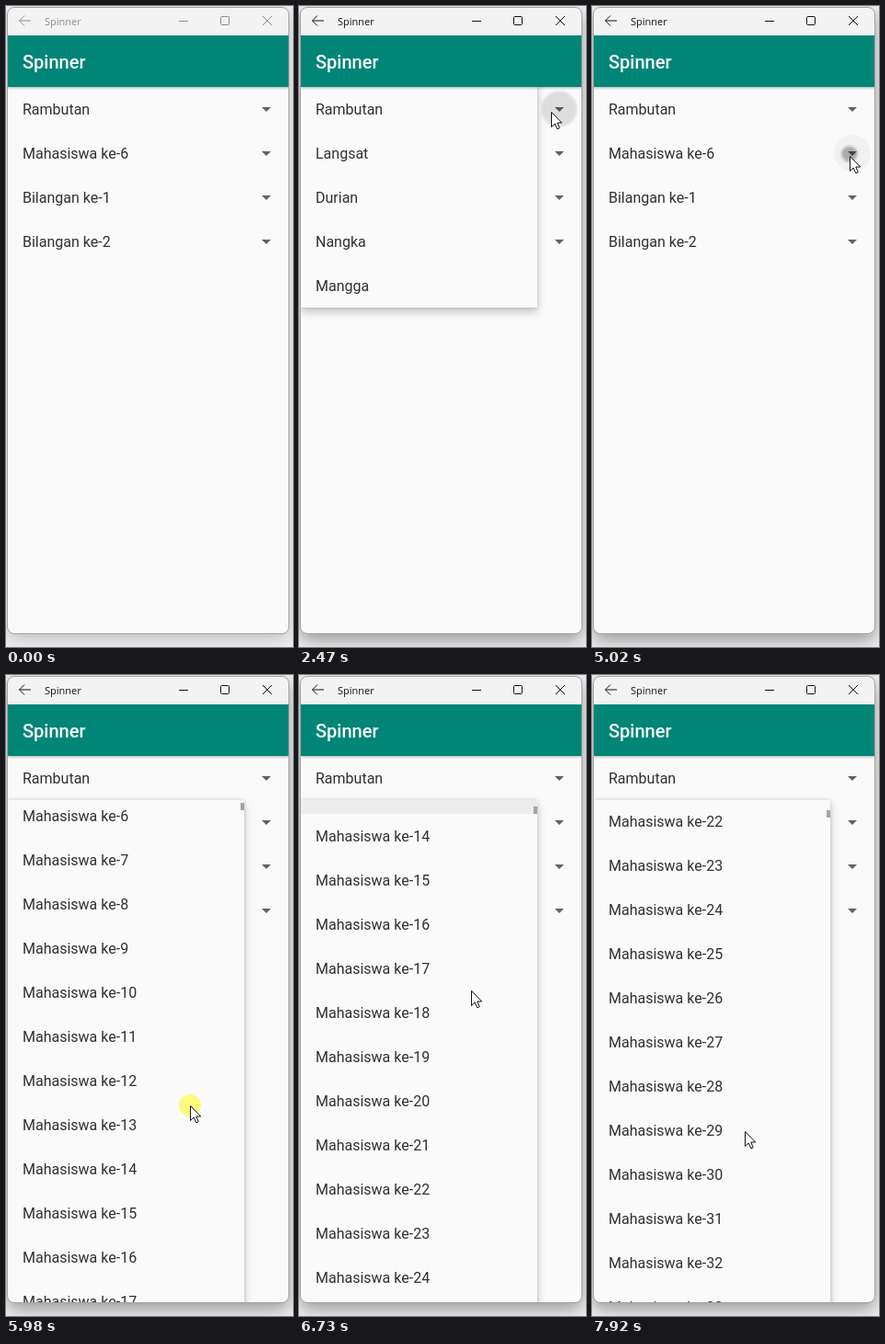
Recreate the animation shown at these times as an HTML page. Size 312 by 697 pixels, loop 7.99 s.

```html
<!DOCTYPE html>
<html lang="id">
<head>
<meta charset="utf-8">
<title>Spinner</title>
<style>
html, body { margin: 0; height: 100%; overflow: hidden; background: #eee; }
svg { display: block; }
text { font: 16px Roboto, sans-serif; fill: #303030; }
#bar text { font: 500 20px Roboto, sans-serif; fill: #fff; }
#caption { stroke: #8c8c8c; fill: none; }
#caption text { font: 11px "Open Sans", sans-serif; fill: #8c8c8c; stroke: none; }
#caption.on { stroke: #111; }
#caption.on text { fill: #111; }
#frame { fill: #fafafa; filter: drop-shadow(0 5px 9px rgba(0,0,0,.2)); }
#frame.on { filter: drop-shadow(0 7px 9px rgba(0,0,0,.36)); }
#bar { filter: drop-shadow(0 1px 1.5px rgba(0,0,0,.3)); }
.panel { fill: #fafafa; filter: drop-shadow(0 0 2px rgba(0,0,0,.14)) drop-shadow(0 5px 5px rgba(0,0,0,.2)); }
</style>
</head>
<body>
<svg width="312" height="697" viewBox="0 0 312 697">
  <defs>
    <clipPath id="window"><rect x="2" y="2" width="305" height="680" rx="7"/></clipPath>
    <clipPath id="listArea"><rect x="2" y="136" width="257" height="546"/></clipPath>
    <filter id="soft" x="-50%" y="-50%" width="200%" height="200%"><feGaussianBlur stdDeviation="1.6"/></filter>
  </defs>
  <rect id="frame" x="1.5" y="1.5" width="306" height="681" rx="7.5"/>
  <g clip-path="url(#window)">
    <rect x="2" y="1" width="306" height="31" fill="#f3f3f3"/>
    <g id="caption">
      <path d="M27 16H14.5M20 10.5L14.5 16L20 21.5M188 16.5H198M279 11L289 21M289 11L279 21"/>
      <rect x="233.5" y="11.5" width="9" height="9" rx="1"/>
      <text x="42" y="21">Spinner</text>
    </g>
    <g id="rows"></g>
    <g id="ripple">
      <circle id="halo" r="20"/>
      <circle id="blob" filter="url(#soft)"/>
    </g>
    <g id="fruits"><rect class="panel" x="2" y="80" width="257" height="248"/></g>
    <g id="students">
      <rect class="panel" x="2" y="136" width="257" height="560"/>
      <g clip-path="url(#listArea)">
        <g id="list"><rect id="hover" x="2" y="472" width="257" height="48" fill="#ededed"/></g>
      </g>
      <rect id="thumb" x="255" width="4" height="8" fill="#a3a3a3"/>
    </g>
    <g id="bar">
      <rect x="2" y="32" width="306" height="56" fill="#008577"/>
      <text x="18" y="68">Spinner</text>
    </g>
  </g>
  <rect x="1.5" y="1.5" width="306" height="681" rx="7.5" fill="none" stroke="#a2a2a2"/>
  <g id="mouse">
    <circle id="press" r="12" fill="#fffb7d"/>
    <path id="arrow" d="M.5 .5V16.5L4.2 13L6.8 18.8L9.3 17.7L6.8 12H11.7Z" fill="#fff" stroke="#111"/>
  </g>
</svg>
<script>
const LOOP = 7990, ROW = 48;
const $ = id => document.getElementById(id);
const set = (id, attrs) => { for (const k in attrs) $(id).setAttribute(k, attrs[k]); };

function add(parent, tag, attrs, label = '') {
  const el = document.createElementNS('http://www.w3.org/2000/svg', tag);
  for (const k in attrs) el.setAttribute(k, attrs[k]);
  el.textContent = label;
  $(parent).append(el);
}
const addText = (parent, mid, label) => add(parent, 'text', { x: 18, y: mid + 6 }, label);

['Rambutan', 'Mahasiswa ke-6', 'Bilangan ke-1', 'Bilangan ke-2'].forEach((label, i) => {
  const y = 112 + i * ROW;
  addText('rows', y, label);
  add('rows', 'path', { d: `M278 ${y - 2}h10l-5 5z`, fill: '#626262' });
});
['Rambutan', 'Langsat', 'Durian', 'Nangka', 'Mangga']
  .forEach((label, i) => addText('fruits', 112 + i * ROW, label));
for (let n = 6; n < 36; n++) addText('list', 160 + (n - 6) * ROW, 'Mahasiswa ke-' + n);

// time, x, y
const path = [
  [750, 197, 651], [1230, 283, 109], [1510, 274, 115], [2810, 274, 115],
  [3490, 93, 276], [3750, 93, 276], [3820, 102, 280], [4080, 190, 371],
  [4250, 190, 371], [4550, 282, 163], [4630, 280, 163], [5250, 280, 163],
  [5390, 271, 180], [5800, 200, 478], [5920, 200, 478], [5980, 200, 468],
  [6190, 194, 200], [6300, 194, 200], [6730, 187, 343], [7000, 175, 535],
  [7080, 175, 535], [7290, 195, 232], [7400, 195, 232], [7850, 166, 493], [7920, 166, 496]
];
// time, list offset
const scroll = [
  [5930, 0], [5980, 5], [6190, 350], [6250, 361], [6600, 369], [7080, 369],
  [7290, 664], [7400, 715], [7550, 750], [7700, 766], [7850, 769]
];
const presses = [[1820, 1960], [4130, 4260], [4780, 4940], [5900, 6190], [7060, 7290]];
// start, end, row centre
const ripples = [[1960, 2740, 112], [4960, 5390, 160]];

const clamp = v => Math.max(0, Math.min(1, v));
const ramp = (t, from, to) => clamp((t - from) / (to - from));
const smooth = u => u * u * (3 - 2 * u);
const linear = u => u;
const within = (t, [from, to]) => t >= from && t < to;

function sample(keys, t, ease) {
  const i = keys.findIndex(k => k[0] > t);
  if (i < 0) return keys.at(-1).slice(1);
  if (i === 0) return keys[0].slice(1);
  const a = keys[i - 1], b = keys[i], u = ease(ramp(t, a[0], b[0]));
  return a.slice(1).map((v, j) => v + (b[j + 1] - v) * u);
}

function drawRipple(t) {
  const r = ripples.find(r => within(t, r));
  set('ripple', { visibility: r ? 'visible' : 'hidden' });
  if (!r) return;
  const [from, to, y] = r, grow = ramp(t, from, from + 300), fade = 1 - ramp(t, to - 250, to);
  set('halo', { cx: 283, cy: y, opacity: .035 * fade });
  set('blob', { cx: 279 + 4 * grow, cy: y + 1 - grow, r: 6 + 13 * grow, opacity: (.34 - .26 * grow) * fade });
}

function draw(t) {
  const focus = t >= 1870 ? 'on' : '';
  set('caption', { class: focus });
  set('frame', { class: focus });

  drawRipple(t);
  set('fruits', { opacity: ramp(t, 2090, 2230) * (1 - ramp(t, 4240, 4380)) });
  set('students', { opacity: ramp(t, 5090, 5230) });

  const offset = Math.round(sample(scroll, t, linear)[0]);
  set('list', { transform: `translate(0 ${-offset})` });
  set('thumb', { y: 139 + Math.round(offset / 96) });
  set('hover', { visibility: within(t, [6250, 6930]) ? 'inherit' : 'hidden' });

  const [x, y] = sample(path, t, smooth).map(Math.round);
  set('mouse', { transform: `translate(${x} ${y})`, visibility: t < 750 ? 'hidden' : 'visible' });
  set('press', { opacity: presses.some(p => within(t, p)) ? 1 : 0 });
}

function tick() {
  draw(performance.now() % LOOP);
  requestAnimationFrame(tick);
}
tick();
</script>
</body>
</html>
```
